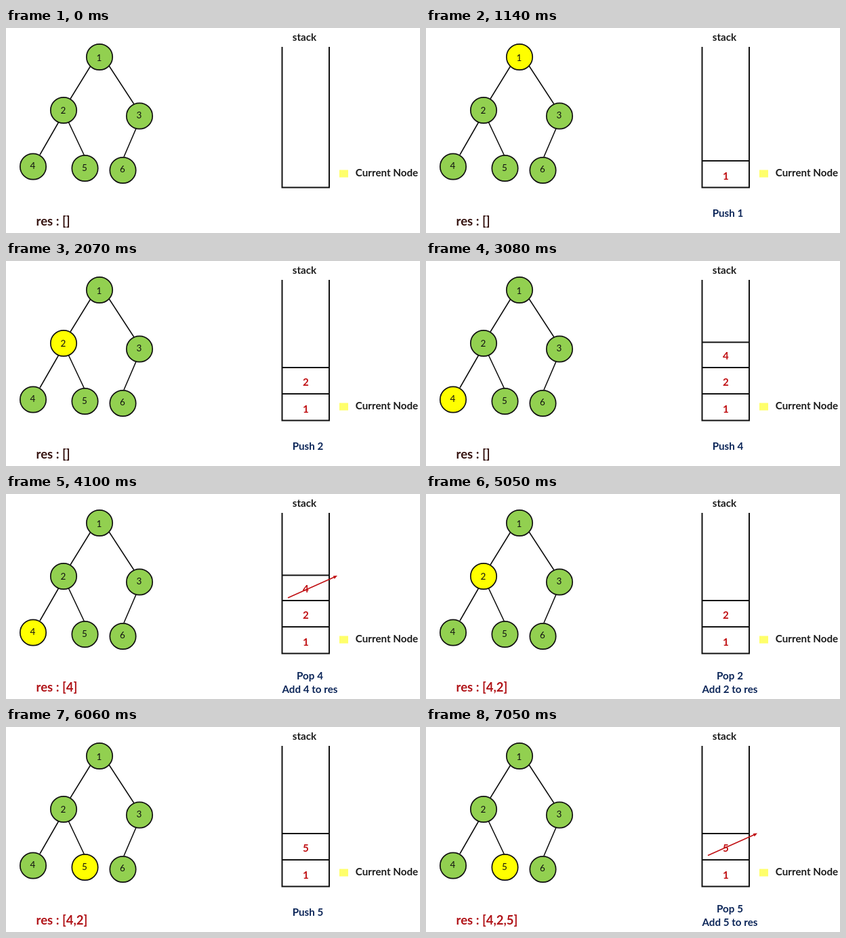
Recreate the animation shown at these times as an HTML page. Size 611 by 304 pixels, loop 8 s.

```html
<!DOCTYPE html>
<html lang="en">
<head>
<meta charset="utf-8">
<title>Inorder traversal with a stack</title>
<style>
  html, body { margin: 0; width: 100%; height: 100%; overflow: hidden; background: #fff; }
  svg { display: block; width: 611px; height: 304px; }
  text { font: bold 15.2px Lato, Carlito, sans-serif; text-anchor: middle; fill: #1c1c1c; }
  .node circle { fill: #92d050; stroke: #111; stroke-width: 1.7; }
  .node.current circle { fill: #ff0; }
  .node text { font-weight: normal; font-size: 13.5px; fill: #111; }
  .edges { stroke: #111; stroke-width: 1.6; }
  .frame, .cell path { fill: none; stroke: #111; stroke-width: 2; }
  .cell text { fill: #c00f12; }
  #res { font-size: 18.5px; text-anchor: start; }
  #note text { fill: #0b2558; }
  #arrow { stroke: #c00f12; fill: #c00f12; stroke-width: 1.6; }
</style>
</head>
<body>
<svg viewBox="0 0 611 304">
  <path class="edges" d="M125 56L95 105M152 56L189 113M78 139L50 188M92 139L116 190M192 149L174 191"/>
  <g id="tree"></g>
  <text x="440.5" y="19">stack</text>
  <path class="frame" d="M407.5 28V236.5H477V28"/>
  <g id="stack"></g>
  <g id="arrow">
    <path d="M416 154L485 123"/>
    <path d="M489 121L482.8 121.6L484.8 126Z" stroke="none"/>
  </g>
  <rect x="492" y="210.5" width="13" height="11" fill="#ffff6b"/>
  <text x="562" y="220">Current Node</text>
  <text id="res" x="44.5" y="293"></text>
  <g id="note"></g>
</svg>
<script>
const $ = id => document.getElementById(id);
const LOOP = 8000;
const nodes = [[138, 43, 44], [85, 122, 122], [197, 130.5, 129.5], [40, 205.5, 204.5], [116.5, 208, 207], [172.5, 211, 209.5]];
const dividers = [197, 158, 120.5], labels = [224.5, 185, 145.5];

// Each step: start time, current node, stack, result, note lines, top popped
const steps = [
  { at: 0, node: 0, stack: [], res: [], note: [] },
  { at: 1140, node: 1, stack: [1], res: [], note: ["Push 1"] },
  { at: 2070, node: 2, stack: [1, 2], res: [], note: ["Push 2"] },
  { at: 3080, node: 4, stack: [1, 2, 4], res: [], note: ["Push 4"] },
  { at: 4100, node: 4, stack: [1, 2, 4], res: [4], note: ["Pop 4", "Add 4 to res"], popped: true },
  { at: 5050, node: 2, stack: [1, 2], res: [4, 2], note: ["Pop 2", "Add 2 to res"] },
  { at: 6060, node: 5, stack: [1, 5], res: [4, 2], note: ["Push 5"] },
  { at: 7050, node: 5, stack: [1, 5], res: [4, 2, 5], note: ["Pop 5", "Add 5 to res"], popped: true }
];

const label = (x, y, s) => `<text x="${x}" y="${y}">${s}</text>`;

$("tree").innerHTML = nodes.map(([x, y, mid], i) =>
  `<g class="node"><circle cx="${x}" cy="${y}" r="19.2"/>${label(x - 0.5, mid + 4.8, i + 1)}</g>`).join("");

function show({ node, stack, res, note, popped }) {
  [...$("tree").children].forEach((g, i) => g.classList.toggle("current", i + 1 === node));
  $("stack").innerHTML = stack.map((n, i) =>
    `<g class="cell"><path d="M407.5 ${dividers[i]}H477"/>${label(442.5, labels[i], n)}</g>`).join("");
  $("arrow").style.display = popped ? "" : "none";
  $("arrow").setAttribute("transform", `translate(0 ${stack.length === 2 ? 36.5 : 0})`);
  $("res").textContent = `res : [${res}]`;
  $("res").style.fill = res.length ? "#b01217" : "#351310";
  const top = note.length > 1 ? 275 : 279.5;
  $("note").innerHTML = note.map((s, i) => label(i || note.length > 1 ? 448.5 : 445.5, top + i * 19.5, s)).join("");
}

let shown;
function tick() {
  const t = performance.now() % LOOP;
  const step = steps.findLast(s => s.at <= t);
  if (step !== shown) show(shown = step);
  requestAnimationFrame(tick);
}
tick();
</script>
</body>
</html>
```
